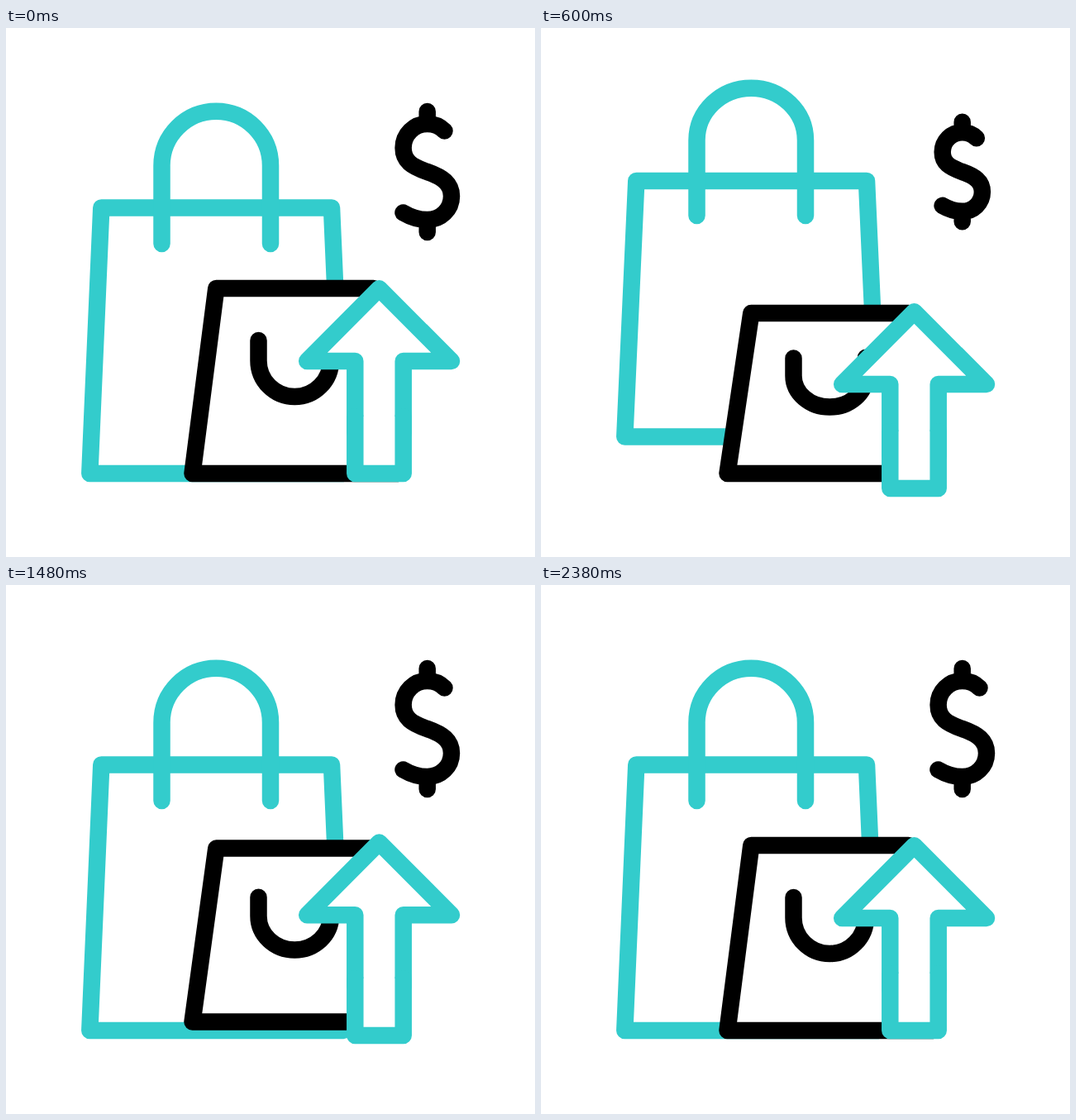
An HTML page that plays this animation: 640x640 px, repeating every 2.4 s.

```html
<!DOCTYPE html>
<html lang="en">
<head>
<meta charset="utf-8">
<title>Shopping growth</title>
<style>
  html, body { margin: 0; width: 100%; height: 100%; overflow: hidden; background: #fff; }
  svg { display: block; width: 100%; height: 100%; }

  path {
    fill: none;
    stroke: #000;
    stroke-width: 20.5;
    stroke-linecap: round;
    stroke-linejoin: round;
    vector-effect: non-scaling-stroke;
  }
  .teal path { stroke: #33cccc; }
  path.solid { fill: #fff; }

  .move {
    animation: 2.4s cubic-bezier(.333, 0, .667, 1) infinite;
    transform-origin: 320px 539px;
  }
  .big { animation-name: big-jump, big-squash; }
  .small { animation-name: small-jump, small-squash; }
  .head { animation-name: head; }
  .foot { animation-name: foot; }
  .dollar { animation-name: pulse; animation-duration: 1.2s; transform-origin: 509.7px 174px; }

  @keyframes big-jump {
    0%, 13.33% { translate: 0 0; }
    28.1% { translate: 0 -50px; }
    47.7%, 100% { translate: 0 0; }
  }
  @keyframes big-squash {
    0% { scale: 1 1; }
    6.8% { scale: 1 .907; }
    29.2% { scale: 1 .968; }
    43.75% { scale: 1 .957; }
    52.2%, 100% { scale: 1 1; }
  }
  @keyframes small-jump {
    0%, 33.5% { translate: 0 0; }
    49.6% { translate: 0 -39px; }
    67.9%, 100% { translate: 0 0; }
  }
  @keyframes small-squash {
    0%, 17.9% { scale: 1 1; }
    25%, 28.75% { scale: 1 .866; }
    50%, 64.2% { scale: 1 .9375; }
    72.5%, 100% { scale: 1 1; }
  }
  @keyframes head {
    0%, 5.83% { translate: 0 0; }
    23.33%, 25% { translate: 0 28px; }
    44.8%, 55% { translate: 0 -19.3px; }
    72.5%, 75% { translate: 0 28px; }
    95.8%, 100% { translate: 0 0; }
  }
  @keyframes foot {
    0%, 5.83% { translate: 0 0; }
    23.33%, 25% { translate: 0 18px; }
    44.8%, 55% { translate: 0 0; }
    72.5%, 75% { translate: 0 18px; }
    95.8%, 100% { translate: 0 0; }
  }
  @keyframes pulse {
    0%, 22.5% { scale: 1; }
    50% { scale: .825; }
    96.7%, 100% { scale: 1; }
  }
</style>
</head>
<body>
<svg viewBox="0 0 640 640">
  <g class="move big teal">
    <path class="solid" d="M115.3 217.4H394L408 539H101.3Z"/>
    <path d="M188.5 261V166.4A65.75 65.75 0 0 1 320 166.4V261"/>
  </g>

  <g class="move small">
    <path class="solid" d="M254.3 315H444.7L473.5 539H225.5Z"/>
    <path d="M305.5 378V402.4A43.75 43.75 0 0 0 393 402.4V377"/>
  </g>

  <!-- head and foot overlap along the shaft, so the arrow can stretch -->
  <g class="teal">
    <g class="move head">
      <path class="solid" d="M422.3 490V403H364.2L451.5 315.2L539 403H480.7V490"/>
    </g>
    <g class="move foot">
      <path class="solid" d="M422.3 470V539H480.7V470"/>
    </g>
  </g>

  <g class="move dollar">
    <path d="M530.5 124.5C525 119 518 116 509.7 116C493.5 116 480.6 129 480.6 145C480.6 161 491 167.5 509.7 174C528 180.5 539 188 539 203.5C539 219.5 526 232 509.7 232C499 232 489 228.5 480.5 223.5M509.7 101V116M509.7 232V247"/>
  </g>
</svg>
</body>
</html>
```
